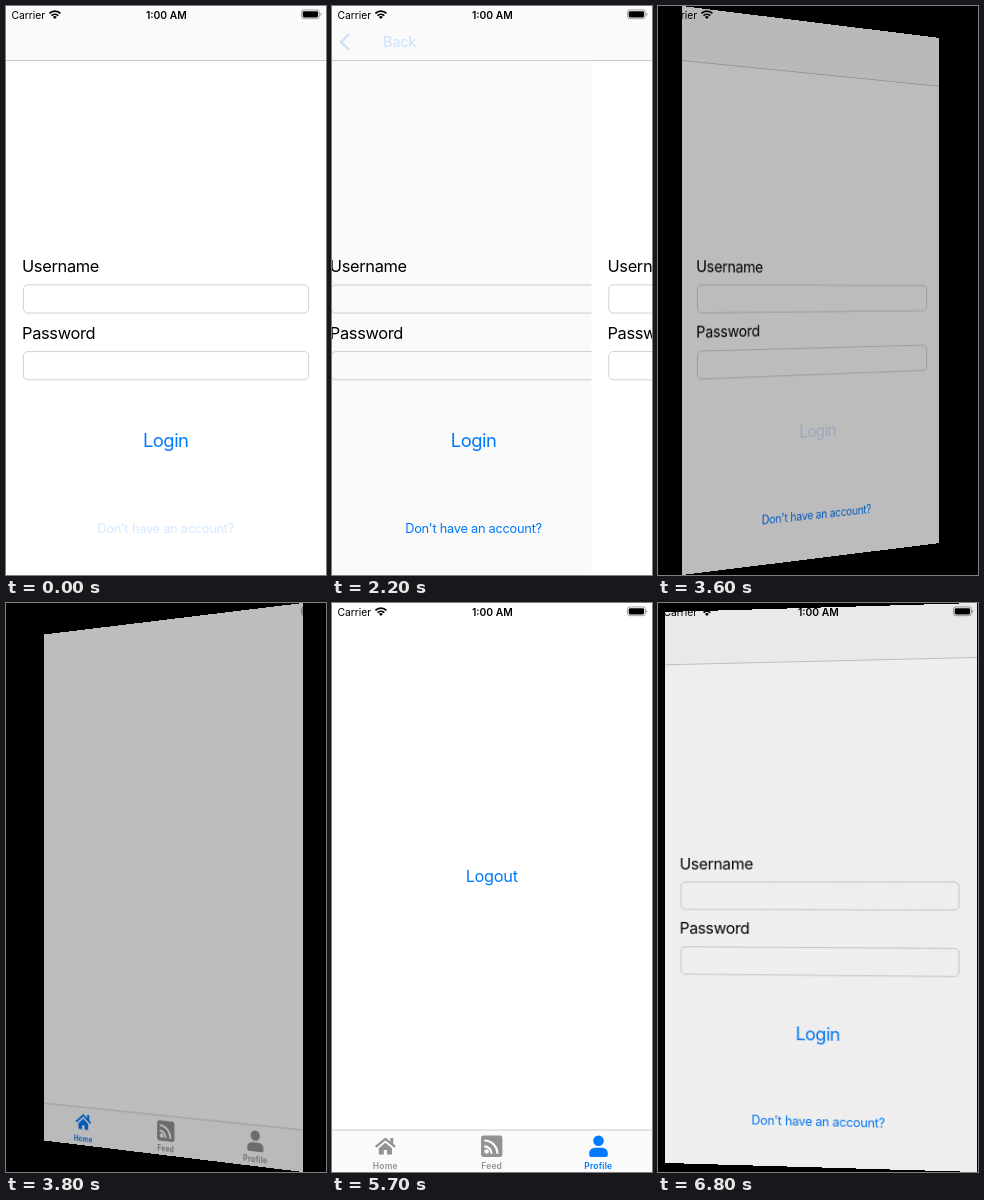
These frames come from a looping animation (320x569 px, 6900 ms). An HTML page:

```html
<!DOCTYPE html>
<html lang="en">
<head>
<meta charset="utf-8">
<title>Login flow</title>
<style>
html, body { margin: 0; width: 100%; height: 100%; overflow: hidden; background: #000; }
#stage { position: relative; width: 320px; height: 569px; overflow: hidden; background: #000; perspective: 1330px; }
.card, svg { position: absolute; left: 0; top: 0; width: 320px; height: 569px; }
.card { overflow: hidden; background: #fff; }
.shade { position: absolute; inset: 0; background: #000; }
text { font-family: Inter, Roboto, sans-serif; letter-spacing: -.02em; }
.label { font-size: 16.4px; }
.button { font-size: 18.4px; letter-spacing: -.027em; }
.button, .small, .link, .back { fill: #007aff; }
.button, .small, .link, .tab { text-anchor: middle; }
.small { font-size: 16.4px; }
.link { font-size: 12.8px; }
.back { font-size: 14.6px; }
.field { fill: #fff; stroke: #cbcbcb; stroke-width: .9; }
.bar { fill: #fafafa; }
.line { fill: #bdbdbd; }
.tab { color: #929292; fill: currentColor; font-size: 8.5px; font-weight: 600; }
.tab text { letter-spacing: .02em; }
.tab.on { color: #007aff; }
.status { font-size: 10.3px; letter-spacing: 0; }
</style>
</head>
<body>
<div id="stage">
  <div class="card" id="auth">
    <svg viewBox="0 0 320 569">
      <defs>
        <g id="form">
          <rect width="320" height="569" fill="#fff"/>
          <text class="label" x="16" y="266">Username</text>
          <rect class="field" x="17.4" y="278.9" width="285.2" height="28.2" rx="4.5"/>
          <text class="label" x="16" y="332.5">Password</text>
          <rect class="field" x="17.4" y="345.6" width="285.2" height="28.2" rx="4.5"/>
        </g>
      </defs>
      <g id="login">
        <use href="#form"/>
        <text class="button" id="loginBtn" x="159.7" y="440.5">Login</text>
        <text class="link" id="link" x="159.7" y="527">Don't have an account?</text>
      </g>
      <rect id="dim" width="320" height="569"/>
      <g id="register">
        <use href="#form"/>
        <text class="button" x="159.7" y="440.5">Register</text>
      </g>
      <rect class="bar" width="320" height="54.3"/>
      <rect class="line" y="54.2" width="320" height=".8"/>
      <g id="back">
        <path d="M16.9 28.2L9 36l7.9 7.8" fill="none" stroke="#007aff" stroke-width="2.3"/>
        <text class="back" id="backText" x="21" y="41">Back</text>
      </g>
    </svg>
    <div class="shade"></div>
  </div>

  <div class="card" id="main">
    <svg viewBox="0 0 320 569">
      <text class="small" id="logout" x="159.7" y="278.5">Logout</text>
      <rect class="bar" y="527" width="320" height="42"/>
      <rect class="line" y="526.6" width="320" height=".8"/>
      <g class="tab">
        <path d="M43.7 543.9l9.7-8 9.7 8" fill="none" stroke="currentColor" stroke-width="2.2"/>
        <path d="M58.4 535h2.9v6h-2.9zM46.8 545.2l6.6-5.4 6.6 5.4v6.4h-5v-4.5h-3.2v4.5h-5z"/>
        <text x="53.3" y="565.5">Home</text>
      </g>
      <g class="tab">
        <rect x="149" y="532.6" width="21.4" height="21.4" rx="2.4"/>
        <circle cx="154.6" cy="548.5" r="2.3" fill="#fafafa"/>
        <path d="M152.2 543.3a7.4 7.4 0 0 1 7.4 7.4M152.2 537.5a13.2 13.2 0 0 1 13.2 13.2" fill="none" stroke="#fafafa" stroke-width="2.2"/>
        <text x="159.7" y="565.5">Feed</text>
      </g>
      <g class="tab">
        <circle cx="266.5" cy="537.8" r="5.3"/>
        <path d="M257.2 552v-1.7a5.6 5.6 0 0 1 5.6-5.6h7.4a5.6 5.6 0 0 1 5.6 5.6v1.7a2 2 0 0 1-2 2h-14.6a2 2 0 0 1-2-2z"/>
        <text x="266.3" y="565.5">Profile</text>
      </g>
    </svg>
    <div class="shade"></div>
  </div>

  <svg viewBox="0 0 320 569">
    <text class="status" x="5.4" y="12.6">Carrier</text>
    <g fill="none" stroke="#000" stroke-width="1.8">
      <path d="M43.4 7.4a7.8 7.8 0 0 1 11 0M45.5 9.7a4.9 4.9 0 0 1 6.8 0"/>
    </g>
    <path d="M46.9 10.9a2.9 2.9 0 0 1 4 0l-2 2.1z"/>
    <text class="status" x="160.3" y="12.6" text-anchor="middle" font-weight="600">1:00 AM</text>
    <rect x="295.4" y="3.9" width="18" height="8.8" rx="2.4" fill="none" stroke="#000" stroke-opacity=".4" stroke-width=".9"/>
    <rect x="296.7" y="5.2" width="15.4" height="6.2" rx="1.4"/>
    <path d="M314.3 6.9q1.2.4 1.2 1.4t-1.2 1.4z" opacity=".4"/>
  </svg>
</div>
<script>
const LOOP = 6900, STEP = 100;
const $ = id => document.getElementById(id);
const tabs = document.querySelectorAll('.tab');

function bezier(x1, y1, x2, y2) {
  const at = (a, b, s) => 3 * (1 - s) * (1 - s) * s * a + 3 * (1 - s) * s * s * b + s * s * s;
  return x => {
    if (x <= 0 || x >= 1) return x;
    let lo = 0, hi = 1;
    for (let i = 0; i < 24; i++) {
      const mid = (lo + hi) / 2;
      if (at(x1, x2, mid) < x) lo = mid; else hi = mid;
    }
    return at(y1, y2, lo);
  };
}
const slide = bezier(.32, .72, 0, 1);
const turn = bezier(.42, 0, .58, 1);
const ramp = (t, from, to) => Math.min(1, Math.max(0, (t - from) / (to - from)));
const move = (el, x) => el.setAttribute('transform', `translate(${x} 0)`);

// Turns a card about its middle, keeping the near edge on the screen plane.
function flip(card, deg) {
  const depth = Math.abs(Math.sin(deg * Math.PI / 180));
  card.style.visibility = Math.abs(deg) < 90 ? 'visible' : 'hidden';
  card.style.transform = deg ? `translateZ(${-160 * depth}px) rotateY(${deg}deg)` : 'none';
  card.querySelector('.shade').style.opacity = depth / 2;
}

function draw(t) {
  // push to the register screen, then pop back
  const shown = slide(ramp(t, 283, 783)) - slide(ramp(t, 2065, 2565));
  move($('login'), -96 * shown);
  move($('register'), 320 * (1 - shown));
  $('dim').style.opacity = .1 * shown;
  const backTap = t >= 1600 ? .2 + .8 * ramp(t, 1850, 2050) : 1;
  $('back').style.opacity = shown * backTap;
  move($('backText'), 37 * (1 - shown));

  // pressed buttons
  $('link').style.opacity = .17 + .83 * ramp(t, 283, 600);
  $('loginBtn').style.opacity = t < 5000 ? 1 - .8 * ramp(t, 3150, 3400) : 1;
  $('logout').style.opacity = t < 5100 ? 0 : 1 - .8 * ramp(t, 6050, 6300);

  // flip to the tabs and back
  const there = 180 * turn(ramp(t, 3462, 3937));
  const home = 180 * turn(ramp(t, 6395, 6870));
  flip($('auth'), t < 5000 ? there : home - 180);
  flip($('main'), t < 5000 ? there - 180 : home);

  const active = t < 4600 ? 0 : t < 5100 ? 1 : 2;
  tabs.forEach((tab, i) => tab.classList.toggle('on', i === active));
}

function tick() {
  // ten pictures a second, with a small lead for display delay
  const now = (performance.now() + 20) % LOOP;
  draw(Math.floor(now / STEP) * STEP);
  requestAnimationFrame(tick);
}
tick();
</script>
</body>
</html>
```
